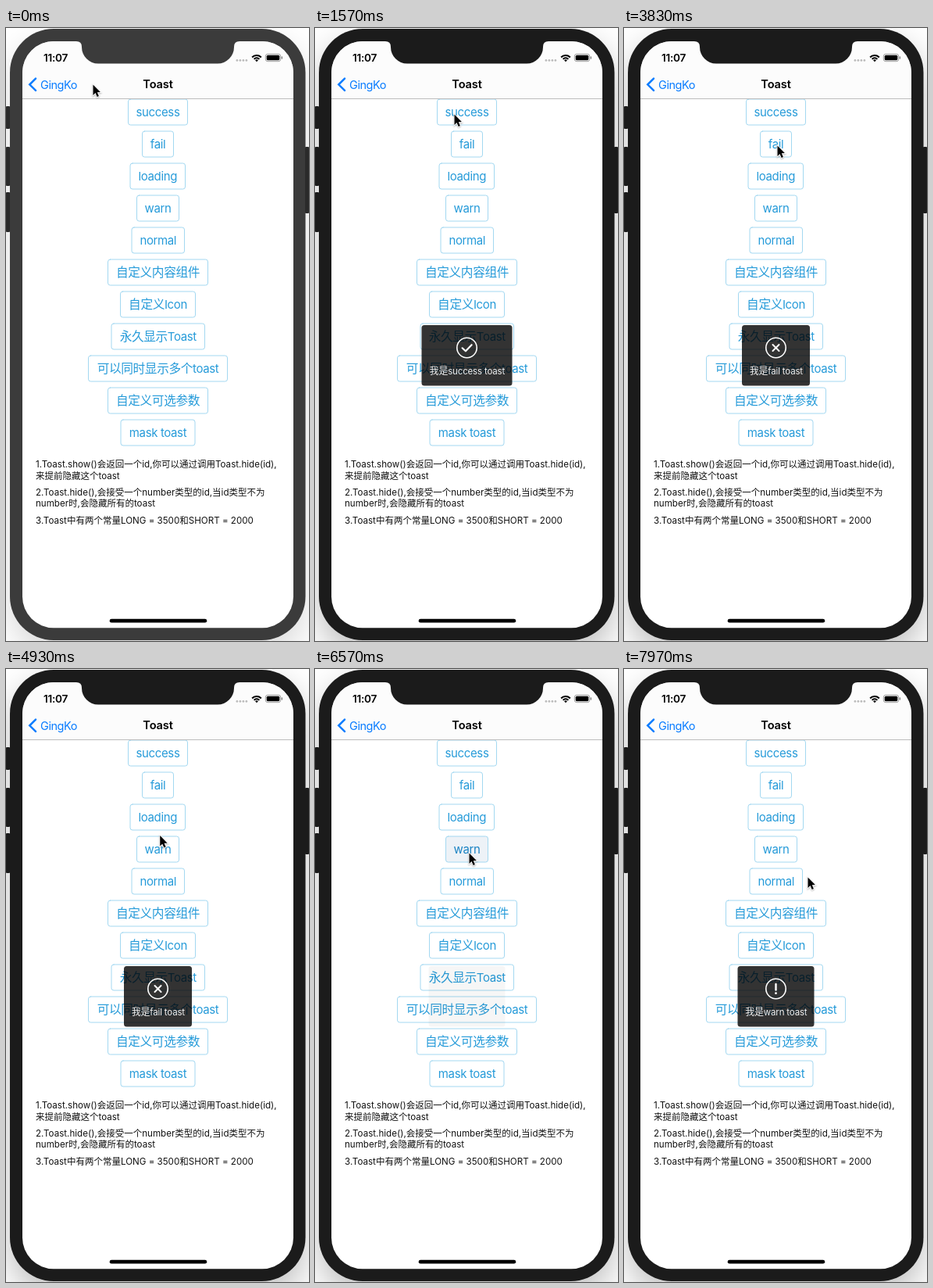
These frames come from a looping animation (388 by 784 pixels, 8000 ms). An HTML page with a canvas:

```html
<!DOCTYPE html>
<html lang="zh">
<head>
<meta charset="utf-8">
<title>Toast</title>
<style>
html, body { margin: 0; width: 100%; height: 100%; overflow: hidden; background: #fff; }
canvas { display: block; width: 388px; height: 784px; }
</style>
</head>
<body>
<canvas id="stage"></canvas>
<script>
const W = 388, H = 784, LOOP = 8000, MID = 194.5;
const LATIN = 'Inter, "Liberation Sans", sans-serif';
const CJK = '"Noto Sans CJK SC", "Noto Sans CJK", sans-serif';
const canvas = document.getElementById('stage');
const ctx = canvas.getContext('2d');
const scale = window.devicePixelRatio || 1;
canvas.width = W * scale;
canvas.height = H * scale;

// label, left edge, right edge
const buttons = [
  ['success', 156, 233], ['fail', 174, 215], ['loading', 158.5, 230],
  ['warn', 167, 222], ['normal', 160.5, 229], ['自定义内容组件', 130, 259],
  ['自定义Icon', 146, 243], ['永久显示Toast', 134.5, 255],
  ['可以同时显示多个toast', 105, 284], ['自定义可选参数', 130, 259],
  ['mask toast', 146.5, 242.5]
];
const notes = [
  ['1.Toast.show()会返回一个id,你可以通过调用Toast.hide(id),', 558],
  ['来提前隐藏这个toast', 572.5],
  ['2.Toast.hide(),会接受一个number类型的id,当id类型不为', 593.5],
  ['number时,会隐藏所有的toast', 608],
  ['3.Toast中有两个常量LONG = 3500和SHORT = 2000', 629.5]
];
const toasts = [
  { name: 'success', start: 1000, end: 3400, width: 116 },
  { name: 'fail', start: 3500, end: 5950, width: 87 },
  { name: 'warn', start: 6545, end: 9000, width: 98 }
];
// button index, press start, press end
const presses = [[0, 850, 1050], [1, 3380, 3560], [3, 6420, 6640]];
// start, end, x, y
const moves = [
  [0, 0, 111, 72.5], [60, 700, 178, 110.5], [1900, 2500, 196, 150.5],
  [4500, 5150, 197, 235.5], [7500, 7880, 235, 266.5]
];

const style = {
  button: { latin: 15, cjk: 15.7, track: -0.025 },
  note: { latin: 11.6, cjk: 11.5, track: 0 },
  toast: { latin: 11.5, cjk: 12, track: -0.015 },
  nav: { latin: 14.5, cjk: 15, track: -0.03 },
  title: { latin: 14.6, cjk: 15, track: -0.01, weight: 600 },
  clock: { latin: 13.6, cjk: 14, track: -0.02, weight: 600 }
};

const clamp = v => Math.max(0, Math.min(1, v));
const smooth = v => { v = clamp(v); return v * v * (3 - 2 * v); };

function box(x, y, w, h, r, fill) {
  ctx.beginPath();
  ctx.roundRect(x, y, w, h, r);
  if (fill) {
    ctx.fillStyle = fill;
    ctx.fill();
  }
}

function stroke(points, width, color) {
  ctx.beginPath();
  points.forEach(([x, y]) => ctx.lineTo(x, y));
  ctx.lineWidth = width;
  ctx.strokeStyle = color;
  ctx.stroke();
}

function setFont(run, s) {
  const wide = run.charCodeAt(0) > 0x2e80;
  const size = wide ? s.cjk : s.latin;
  ctx.font = `${s.weight || 400} ${size}px ${wide ? CJK : LATIN}`;
  ctx.letterSpacing = `${size * s.track}px`;
}

// Draws Latin and Chinese runs on a shared baseline around y.
function text(str, x, y, s, color, centered) {
  const runs = str.match(/[\u2e80-\uffff]+|[^\u2e80-\uffff]+/g);
  const widths = runs.map(run => { setFont(run, s); return ctx.measureText(run).width; });
  if (centered) x -= widths.reduce((a, b) => a + b, 0) / 2;
  ctx.fillStyle = color;
  runs.forEach((run, i) => {
    setFont(run, s);
    ctx.fillText(run, x, y + s.latin * 0.365);
    x += widths[i];
  });
}

function drawBody(active) {
  const shell = active ? '#1b1b1b' : '#3b3b3b';
  ctx.fillStyle = '#fff';
  ctx.fillRect(0, 0, W, H);
  ctx.save();
  ctx.shadowColor = `rgba(0,0,0,${active ? 0.25 : 0.15})`;
  ctx.shadowBlur = 40 * scale;
  ctx.shadowOffsetY = 18 * scale;
  box(5, 1, 378.5, 782, 56, shell);
  ctx.restore();
  for (const [x, y, h] of [[0, 100, 29], [0, 152, 50], [0, 210, 51], [383, 152, 85]]) {
    box(x, y, 5, h, 1, active ? '#1b1b1b' : '#2a2a2a');
  }
  box(21, 17, 347, 750.3, 40, '#fff');
  ctx.save();
  ctx.clip();
  ctx.fillStyle = '#fcfcfc';
  ctx.fillRect(21, 17, 347, 74);
  ctx.restore();
  ctx.beginPath();
  ctx.moveTo(90, 16);
  ctx.lineTo(90, 17);
  ctx.quadraticCurveTo(97, 17, 97, 24);
  ctx.arcTo(97, 45.5, 118, 45.5, 21);
  ctx.arcTo(292, 45.5, 292, 24, 21);
  ctx.lineTo(292, 24);
  ctx.quadraticCurveTo(292, 17, 299, 17);
  ctx.lineTo(299, 16);
  ctx.fillStyle = shell;
  ctx.fill();
  box(132.7, 755.8, 124.5, 4.7, 2.35, '#000');
}

function drawStatus() {
  text('11:07', 48, 38, style.clock, '#000');
  for (let i = 0; i < 4; i++) box(294.5 + i * 4, 40, 2.8, 2.8, 1.4, '#bbb');
  ctx.strokeStyle = '#000';
  ctx.lineWidth = 2.1;
  ctx.lineCap = 'butt';
  for (const r of [4.6, 8]) {
    ctx.beginPath();
    ctx.arc(321, 43, r, -Math.PI * 0.76, -Math.PI * 0.24);
    ctx.stroke();
  }
  ctx.beginPath();
  ctx.moveTo(321, 43.3);
  ctx.arc(321, 43, 2.6, -Math.PI * 0.76, -Math.PI * 0.24);
  ctx.fillStyle = '#000';
  ctx.fill();
  box(332.3, 33.3, 19.4, 9.4, 2.8);
  ctx.lineWidth = 0.8;
  ctx.strokeStyle = '#888';
  ctx.stroke();
  box(333.7, 34.7, 16.6, 6.6, 1.6, '#000');
  box(352.6, 36.3, 1.5, 3.4, 0.8, '#888');
}

function drawNav() {
  ctx.lineCap = 'round';
  ctx.lineJoin = 'miter';
  stroke([[38, 64.7], [30.3, 72.3], [38, 79.9]], 2.5, '#087cff');
  text('GingKo', 44, 72.3, style.nav, '#087cff');
  text('Toast', MID, 72, style.title, '#000', true);
}

function drawPage(t) {
  buttons.forEach(([label, left, right], i) => {
    const y = 107.5 + i * 41;
    const pressed = presses.some(([n, from, to]) => n === i && t >= from && t < to);
    box(left + 0.5, y - 16.5, right - left - 1, 33, 3, pressed ? '#edf2f7' : '#fff');
    ctx.lineWidth = 1;
    ctx.strokeStyle = '#a3d8f1';
    ctx.stroke();
    text(label, (left + right) / 2, y, style.button, pressed ? '#1c84c4' : '#269bd9', true);
  });
  ctx.fillStyle = '#bcbcbc';
  ctx.fillRect(21, 90, 347, 1);
  notes.forEach(([line, y]) => text(line, 38, y, style.note, '#111'));
}

function drawIcon(name) {
  const y = 409;
  ctx.lineCap = ctx.lineJoin = 'round';
  ctx.beginPath();
  ctx.arc(MID, y, 12.7, 0, Math.PI * 2);
  ctx.lineWidth = 1.6;
  ctx.strokeStyle = '#fff';
  ctx.stroke();
  if (name === 'success') {
    stroke([[188.6, y + 0.3], [192.9, y + 4.3], [200.6, y - 3.8]], 2.2, '#fff');
  } else if (name === 'fail') {
    stroke([[MID - 4, y - 4], [MID + 4, y + 4]], 2, '#fff');
    stroke([[MID + 4, y - 4], [MID - 4, y + 4]], 2, '#fff');
  } else {
    stroke([[MID, y - 6], [MID, y + 1.5]], 2.4, '#fff');
    box(MID - 1.4, y + 4.3, 2.8, 2.8, 1.4, '#fff');
  }
}

function drawToast({ name, start, end, width }, t) {
  const alpha = Math.min(smooth((t - start) / 200), smooth((end - t) / 200));
  if (alpha <= 0) return;
  ctx.save();
  ctx.globalAlpha = alpha;
  box(MID - width / 2, 380, width, 77.4, 3.5, 'rgba(0,0,0,0.8)');
  drawIcon(name);
  text(`我是${name} toast`, MID + 0.3, 438.7, style.toast, '#f2f2f2', true);
  ctx.restore();
}

function drawCursor(t) {
  let [, , x, y] = moves[0];
  for (const [from, to, tx, ty] of moves.slice(1)) {
    const k = smooth((t - from) / (to - from));
    x += (tx - x) * k;
    y += (ty - y) * k;
  }
  const shape = [[0, 0], [0, 13.4], [3, 10.6], [5.2, 15.4], [7.4, 14.4], [5.3, 9.8], [9.4, 9.6]];
  ctx.save();
  ctx.translate(x + 0.5, y);
  ctx.beginPath();
  shape.forEach(([px, py]) => ctx.lineTo(px, py));
  ctx.closePath();
  ctx.lineJoin = 'miter';
  ctx.lineWidth = 1.8;
  ctx.strokeStyle = '#fff';
  ctx.shadowColor = 'rgba(0,0,0,0.3)';
  ctx.shadowBlur = 2 * scale;
  ctx.shadowOffsetY = scale;
  ctx.stroke();
  ctx.shadowColor = 'transparent';
  ctx.fillStyle = '#000';
  ctx.fill();
  ctx.restore();
}

function render(t) {
  ctx.setTransform(scale, 0, 0, scale, 0, 0);
  drawBody(t >= 750);
  drawStatus();
  drawNav();
  drawPage(t);
  toasts.forEach(toast => drawToast(toast, t));
  drawCursor(t);
}

const begin = performance.now();
function tick() {
  render((performance.now() - begin) % LOOP);
  requestAnimationFrame(tick);
}
tick();
</script>
</body>
</html>
```
